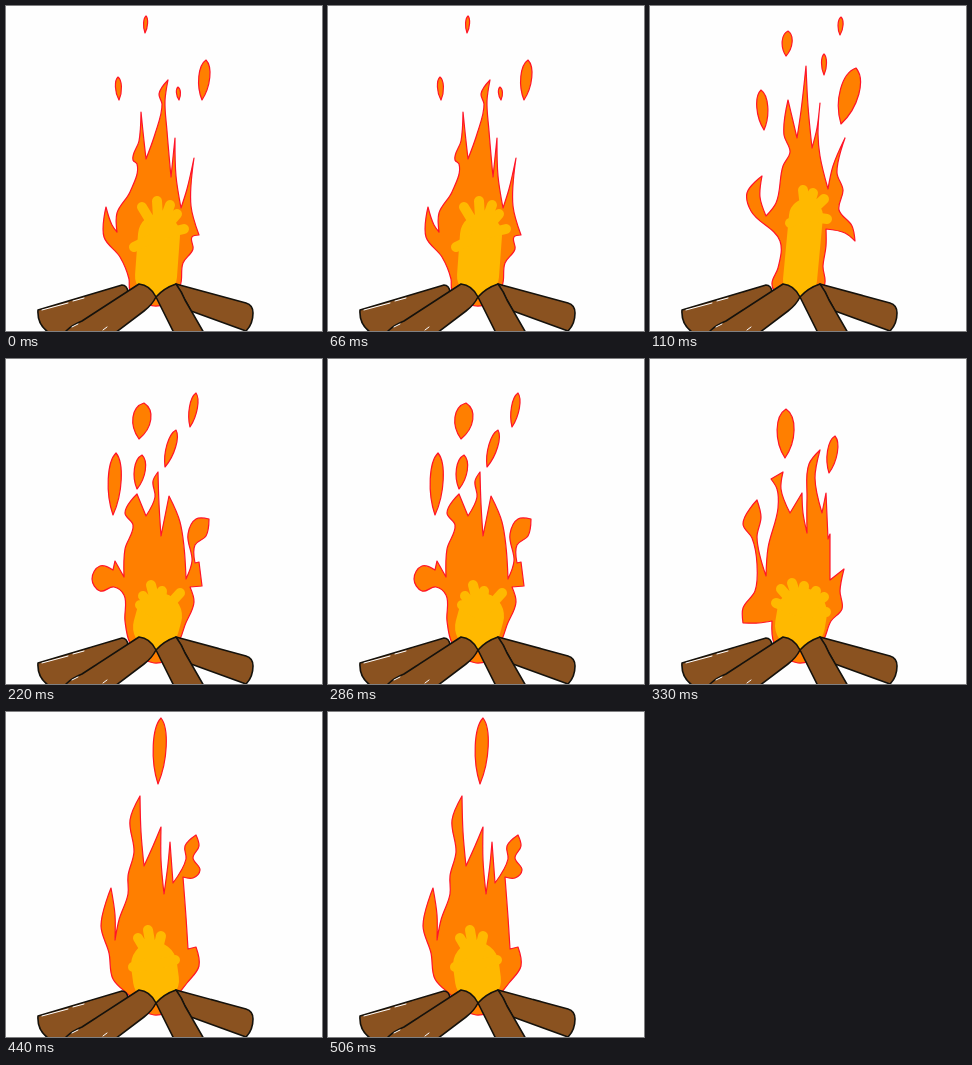
An HTML page that plays this animation: 316 px wide and 325 px high, repeating every 0.55 s.

```html
<!DOCTYPE html>
<html lang="en">
<head>
<meta charset="utf-8">
<title>Campfire</title>
<style>
  html, body { margin: 0; width: 100%; height: 100%; overflow: hidden; background: #fefefe; }
  svg { display: block; width: 316px; height: 325px; }
  .pose { visibility: hidden; animation: show 550ms step-end infinite; }
  .outer { fill: #ff7f00; stroke: #ff1428; stroke-width: 1.2; stroke-linejoin: round; }
  .core { fill: none; stroke: #ffb900; stroke-linecap: round; }
  .logs { fill: #8a5220; stroke: #15120c; stroke-width: 1.6; stroke-linejoin: round; stroke-linecap: round; }
  .shine { fill: none; stroke: #fefefe; stroke-linecap: round; }
  @keyframes show {
    0% { visibility: visible; }
    20%, 100% { visibility: hidden; }
  }
</style>
</head>
<body>
<svg viewBox="0 0 316 325">
  <g id="fire"></g>
  <g class="logs">
    <path d="M32 304L116 279Q121 279 122 286L70 326H42Q31 318 32 304Z"/>
    <path d="M170 278L240 297Q247 299 247 307Q247 318 240 325L185 305Z"/>
    <path d="M60 325Q66 319 76 315L133 278Q144 279 150 291Q146 299 138 305L109 327H60Z"/>
    <path d="M150 291Q158 282 170 278Q176 286 179 294L198 327H168Z"/>
  </g>
  <path class="shine" d="M36 304L62 297M67 295L78 292M66 321L72 318M97 324L101 321"/>
</svg>
<script>
  // flame: key points up the left side, over the tips and down the right side
  // core: centre and radius of the glow; fingers: ends of the tongues leaving it
  // sparks: top point, bottom point, width
  const poses = [
    {
      flame: `123,273 114,251 98,231 100,201 106,219 111,226 111,207 124,186 131,158 127,154 133,135 135,106
        138,135 140,153 149,128 156,98 153,88 162,74 159,95 161,125 165,171 169,132 170,170 175,202 181,183
        188,152 185,200 193,229 186,231 187,243 177,257`,
      foot: 298,
      core: [153, 229, 21], fingers: '136,201 151,195 164,199 171,208 178,223 128,241',
      sparks: [[140, 10, 139, 27, 4], [200, 54, 196, 94, 11], [112, 71, 113, 94, 6], [172, 81, 173, 94, 4]]
    },
    {
      flame: `122,277 128,262 130,235 101,205 97,187 112,170 110,191 116,210 126,197 133,160 140,146 134,129
        138,94 143,115 147,132 151,105 156,60 158,100 162,142 167,122 170,97 168,128 170,150 178,183 183,160
        195,132 187,167 193,184 189,204 202,220 205,235 195,227 176,223 176,240 173,260`,
      foot: 288,
      core: [156, 210, 17], fingers: '153,184 163,187 174,193 177,213 140,217 148,204',
      sparks: [[138, 25, 136, 50, 10], [191, 11, 190, 29, 5], [174, 48, 174, 69, 5],
        [111, 84, 114, 124, 11], [206, 62, 191, 118, 19]]
    },
    {
      flame: `119,262 118,236 108,228 94,232 86,220 94,207 107,211 109,202 118,218 119,190 127,166 119,154
        131,135 140,157 149,138 147,122 152,113 153,145 155,177 163,137 174,163 180,220 186,202 182,175
        190,160 203,160 200,177 189,186 189,204 193,203 196,227 184,228 188,243 179,266`,
      foot: 302,
      core: [153, 257, 23], fingers: '137,237 145,226 156,232 174,234 134,246',
      sparks: [[138, 44, 133, 80, 18], [190, 34, 184, 68, 8], [170, 71, 159, 108, 9],
        [110, 94, 107, 156, 13], [136, 96, 131, 130, 11]]
    },
    {
      flame: `122,262 109,264 93,264 93,249 105,232 107,205 102,179 93,165 107,141 111,158 107,178 116,217
        118,189 128,149 127,130 121,120 133,113 131,130 140,154 152,134 153,154 157,174 157,139 159,105
        170,91 165,119 172,154 176,134 178,180 180,175 180,221 194,210 190,232 192,250 181,262`,
      foot: 302,
      core: [152, 254, 25], fingers: '131,230 142,224 154,227 166,232 174,238 176,253 126,244',
      sparks: [[136, 50, 135, 99, 17], [185, 77, 179, 114, 10]]
    },
    {
      flame: `107,267 103,241 95,214 105,176 109,203 109,228 113,208 122,182 122,164 128,140 124,108 134,84
        135,120 138,154 147,134 155,115 155,148 158,182 162,152 164,130 167,171 180,147 179,134 190,123
        193,134 187,146 194,158 187,166 177,165 180,205 182,237 190,235 193,254 181,271`,
      foot: 301,
      core: [148, 253, 23], fingers: '132,226 142,218 155,224 169,248 127,255',
      sparks: [[155, 6, 152, 72, 13]]
    }
  ];

  const points = text => text.trim().split(/\s+/).map(p => p.split(',').map(Number));
  const dir = (a, b) => {
    const x = b[0] - a[0], y = b[1] - a[1], len = Math.hypot(x, y) || 1;
    return [x / len, y / len];
  };

  // Smooth closed curve through the points; sharp turns stay pointed.
  function outline(pts) {
    const n = pts.length;
    const tangent = pts.map((p, i) => {
      const a = dir(pts[(i + n - 1) % n], p), b = dir(p, pts[(i + 1) % n]);
      return a[0] * b[0] + a[1] * b[1] < 0.1 ? [0, 0] : dir([0, 0], [a[0] + b[0], a[1] + b[1]]);
    });
    const curves = pts.map((p, i) => {
      const j = (i + 1) % n, q = pts[j];
      const k = Math.hypot(q[0] - p[0], q[1] - p[1]) / 3;
      const c1 = p.map((v, m) => v + tangent[i][m] * k);
      const c2 = q.map((v, m) => v - tangent[j][m] * k);
      return `C${c1} ${c2} ${q}`;
    });
    return `M${pts[0]}${curves.join('')}Z`;
  }

  // Leaf between two points, fuller near the top.
  function spark([x1, y1, x2, y2, width]) {
    const [ux, uy] = dir([x1, y1], [x2, y2]);
    const at = (t, side) => {
      const off = side * width / 1.5;
      return [x1 + (x2 - x1) * t - uy * off, y1 + (y2 - y1) * t + ux * off];
    };
    return `M${x1} ${y1}C${at(0.15, 1)} ${at(0.65, 1)} ${x2} ${y2}C${at(0.65, -1)} ${at(0.15, -1)} ${x1} ${y1}Z`;
  }

  const flame = ({ flame, foot }) =>
    outline([[124, 284], ...points(flame), [174, 280], [158, foot], [148, foot + 2], [138, foot - 2]]);

  function core({ core: [x, y, r], fingers }) {
    const rays = points(fingers).map(tip => `M${x} ${y}L${tip}`).join('');
    return `<path class="core" stroke-width="${r * 2}" d="M${x} ${y}L150 ${291 - r}"/>
      <path class="core" stroke-width="10" d="${rays}"/>`;
  }

  document.getElementById('fire').innerHTML = poses.map((pose, i) => `
    <g class="pose" style="animation-delay:${i * 110 - 550}ms">
      <path class="outer" d="${flame(pose)}${pose.sparks.map(spark).join('')}"/>
      ${core(pose)}
    </g>`).join('');
</script>
</body>
</html>
```
